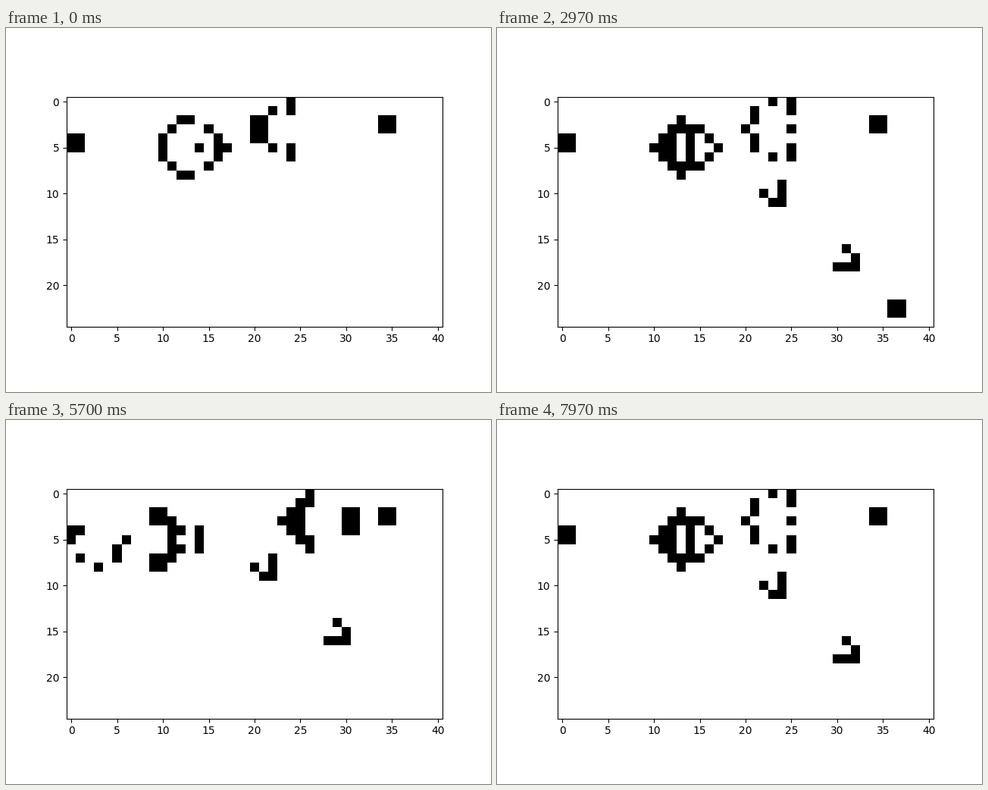
A matplotlib script that plays this animation: 640x480 px, repeating every 8000 ms.

```python
import numpy as np
import matplotlib.pyplot as plt
from matplotlib.animation import FuncAnimation

ROWS, COLS = 25, 41
LOOP_MS = 8000
GENERATIONS = 240
TICKS = 2 * GENERATIONS  # half-step ticks, so each generation is centred on its time


def glider_gun():
    """Both halves of the gun are mirror images about their own middle row."""
    grid = np.zeros((ROWS, COLS), dtype=int)

    # Blocks at the two ends
    grid[4:6, 0:2] = 1
    grid[2:4, 34:36] = 1

    # Left shuttle: a ring with a nose, around row 5
    mid = 5
    for d in range(-3, 4):
        r = abs(d)
        grid[mid + d, 10 + max(0, r - 1)] = 1
        grid[mid + d, 16 - r * (r - 1) // 2] = 1
    grid[mid, [14, 17]] = 1

    # Right shuttle: a bar with two open jaws, around row 3
    mid = 3
    grid[mid - 1:mid + 2, 20:22] = 1
    for side in (-1, 1):
        grid[mid + 2 * side, [22, 24]] = 1
        grid[mid + 3 * side, 24] = 1
    return grid


def step(grid):
    around = sum(
        np.roll(grid, (dy, dx), axis=(0, 1))
        for dy in (-1, 0, 1)
        for dx in (-1, 0, 1)
        if dy or dx
    )
    new = ((around == 3) | ((grid == 1) & (around == 2))).astype(int)
    new[-1] = 0  # the bottom row stays dead
    return new


def evolve(grid, count):
    history = [grid]
    while len(history) < count:
        history.append(step(history[-1]))
    return history


history = evolve(glider_gun(), GENERATIONS)

fig, ax = plt.subplots(figsize=(6.4, 4.8), dpi=100)
image = ax.imshow(history[0], cmap="binary", vmin=0, vmax=1, interpolation="nearest")


def draw(tick):
    generation = min((tick + 1) // 2, GENERATIONS - 1)
    image.set_data(history[generation])
    return [image]


def reset():
    return draw(0)


anim = FuncAnimation(
    fig, draw, frames=TICKS, init_func=reset,
    interval=LOOP_MS / TICKS, repeat=True, repeat_delay=0, blit=False,
)

plt.show()
```
